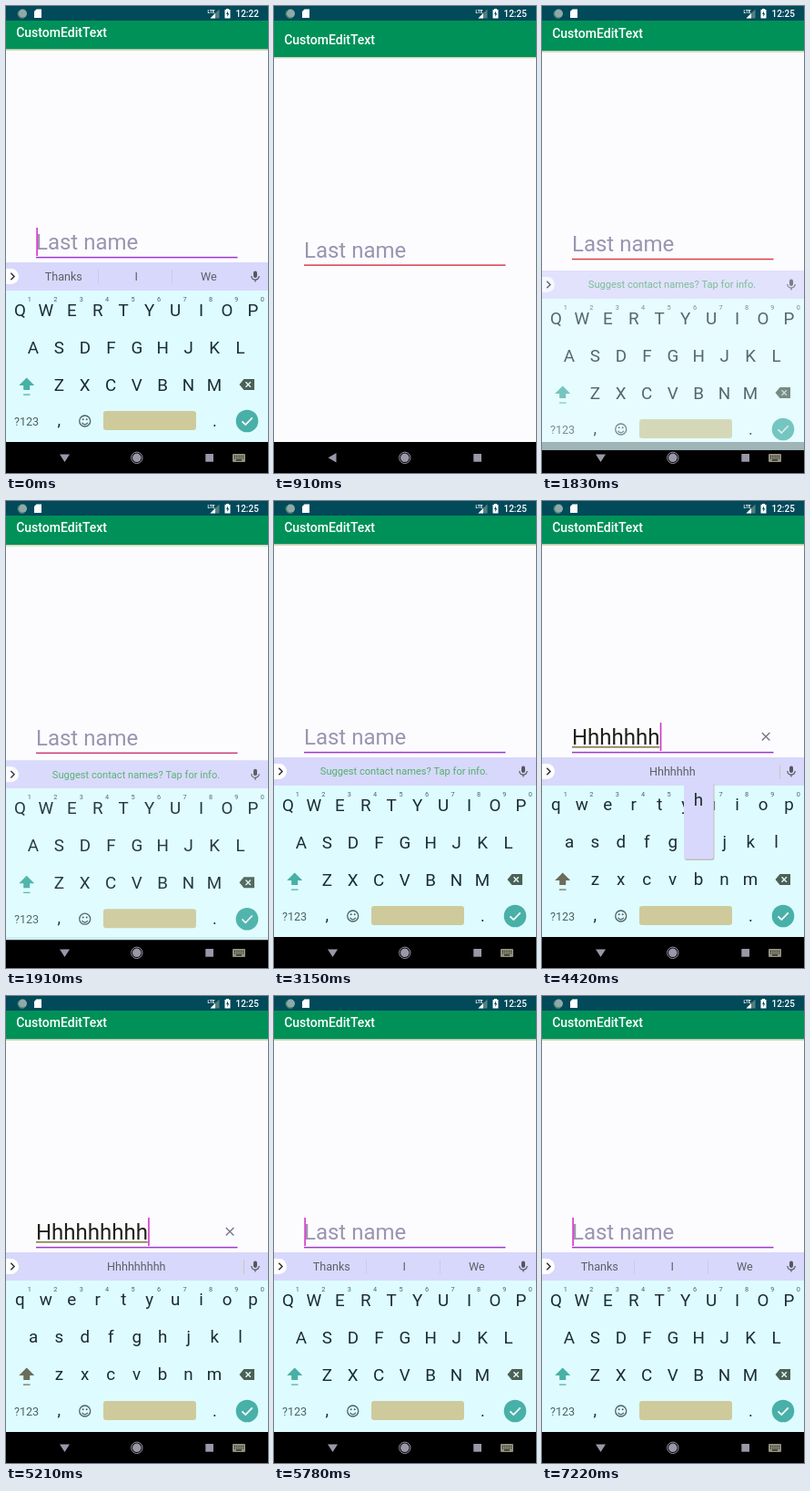
These frames come from a looping animation (288 by 512 pixels, 7.36 s). An HTML page with a canvas:

```html
<!DOCTYPE html>
<html lang="en">
<head>
<meta charset="utf-8">
<title>CustomEditText</title>
<style>
  html, body { margin: 0; width: 100%; height: 100%; overflow: hidden; background: #fcfcff; }
  canvas { display: block; width: 288px; height: 512px; }
</style>
</head>
<body>
<canvas id="stage" width="288" height="512"></canvas>
<script>
const c = document.getElementById('stage').getContext('2d');
const LOOP = 7360, PAN = 8.5;
const TAP = 3370, GAP = 170, TAPS = 9, HOLD = 130, LAG = 20;
const RELEASE = 5210, CLEAR = 5610, CAPS = 5690, IDLE = 5780;
const ROWS = [['QWERTYUIOP', 15.4, 340], ['ASDFGHJKL', 30, 381], ['ZXCVBNM', 58.3, 422]];
const STEP = 28.45;

const clamp = v => Math.max(0, Math.min(1, v));

function rect(x, y, w, h, color) {
  c.fillStyle = color;
  c.fillRect(x, y, w, h);
}

function round(x, y, w, h, r, color) {
  c.fillStyle = color;
  c.beginPath();
  c.roundRect(x, y, w, h, r);
  c.fill();
}

function disc(x, y, r, color) {
  c.fillStyle = color;
  c.beginPath();
  c.arc(x, y, r, 0, 7);
  c.fill();
}

function text(s, x, y, size, color, align = 'left', weight = 400) {
  c.font = `${weight} ${size}px Roboto, sans-serif`;
  c.textAlign = align;
  c.fillStyle = color;
  c.fillText(s, x, y);
}

function fill(d, color) {
  c.fillStyle = color;
  c.fill(new Path2D(d));
}

function line(d, color, width = 1) {
  c.strokeStyle = color;
  c.lineWidth = width;
  c.stroke(new Path2D(d));
}

function statusBar(time) {
  rect(0, 0, 288, 16, '#004a5a');
  disc(18.2, 8.3, 4.8, '#8fa9a8');
  line('M14.5 5.5A4.6 4.6 0 0 0 20 12.6', '#4f8a72', 1.4);
  fill('M33.5 3.5H39V13H31V6Z', '#fff');
  text('LTE', 221.5, 7.5, 5, '#fff', 'left', 700);
  fill('M224.5 13.5L234.5 3.5V13.5Z', '#55807f');
  fill('M224.5 13.5L230 8V13.5Z', '#fff');
  fill('M242 3H245V4H246.5V13.5H240.5V4H242Z', '#fff');
  fill('M244 5.5L242 9H243.3V12L245.2 8.2H244Z', '#004a5a');
  text(time, 252.5, 12, 10, '#fff', 'left', 500);
}

function navBar(typing) {
  rect(0, 478, 288, 34, '#000');
  const grey = '#9898a8';
  fill(typing ? 'M59 491.5H70L64.5 500Z' : 'M59.5 495.3L68.5 490V500.5Z', grey);
  disc(143.8, 495.3, 4.8, grey);
  line('M137.6 495.3a6.2 6.2 0 1 0 12.4 0a6.2 6.2 0 1 0 -12.4 0', grey);
  rect(219.3, 491, 8.7, 8.7, grey);
  if (typing) {
    round(249, 491, 14, 9, 1, '#8f8f7c');
    for (let i = 0; i < 10; i++) rect(251 + i % 5 * 2.3, 493 + (i > 4) * 2.2, 1, 1, '#000');
    rect(253, 497.4, 6, 1, '#000');
  }
}

function app(pan, word, lineColor, cursor) {
  rect(0, 0, 288, 512, '#fcfcff');
  c.save();
  c.translate(0, -pan);
  rect(0, 16, 288, 40, '#009158');
  rect(0, 56, 288, 1.5, '#dcd8bc');
  text('CustomEditText', 11.2, 42, 14, '#fff', 'left', 500);
  if (word) {
    text(word, 33, 275.5, 24, '#202018');
    rect(33, 277.7, c.measureText(word).width, 1.3, '#6c6424');
    line('M241.8 262.4l8.6 8.6m0 -8.6l-8.6 8.6', '#77778a', 1.4);
  } else {
    text('Last name', 33, 275.5, 24, '#9a95b0');
  }
  rect(33, 283.4, 221.5, 1.5, lineColor);
  c.restore();
  if (cursor) {
    c.font = '24px Roboto, sans-serif';
    rect(33.3 + c.measureText(word).width, 243, 1.6, 31, '#d832c8');
  }
}

function strip(mode, word) {
  rect(0, 281, 288, 31, '#d8d8fc');
  round(-10, 288, 24, 17, 8.5, '#fff');
  line('M5.3 292.8L9 296.5L5.3 300.2', '#303038', 1.5);
  round(272, 290.5, 4, 7.5, 2, '#55555c');
  line('M269.8 296a4.2 4.2 0 0 0 8.4 0M274 300v2.6', '#55555c', 1.2);
  const ink = '#5c6068';
  if (mode === 'info') {
    text('Suggest contact names? Tap for info.', 143, 300.3, 11.1, '#4fb06c', 'center');
  } else if (mode === 'word') {
    text(word, 143.3, 301, 12.6, ink, 'center');
    rect(261, 289, 1, 16, '#c9c6bc');
  } else if (mode === 'idle') {
    ['Thanks', 'I', 'We'].forEach((s, i) => text(s, 63.3 + i * 79.8, 301, 12.6, ink, 'center'));
    rect(101, 289, 1, 16, '#cccce6');
    rect(182, 289, 1, 16, '#cccce6');
  }
}

function keyboard(mode, word, lower, pressed) {
  const ink = '#1c2c34', soft = '#4c6064';
  const label = s => lower ? s.toLowerCase() : s;
  strip(mode, word);
  rect(0, 312, 288, 166, '#defcff');

  ROWS.forEach(([keys, x, y], row) => [...keys].forEach((k, i) => {
    text(label(k), x + i * STEP, lower ? y - 1 : y, 18.8, ink, 'center');
    if (!row) text((i + 1) % 10, x + 10.4 + i * STEP, 324, 7.3, soft, 'center');
  }));

  const shift = lower ? '#6c6c5c' : '#48b0a4';
  fill('M22.7 407.5L31.2 416H26.2V421H19.2V416H14.2Z', shift);
  rect(19, 425.5, 7.5, 1.2, shift);
  fill('M256.5 415L261.5 409H273V421H261.5Z', '#4c6054');
  line('M263.5 412.3l5.4 5.4m0 -5.4l-5.4 5.4', '#defcff', 1.4);

  text('?123', 9, 459.6, 12.6, soft);
  text(',', 58.3, 460, 18, ink, 'center');
  text('.', 229.3, 461, 18, ink, 'center');
  line('M80.7 455a6 6 0 1 0 12 0a6 6 0 1 0 -12 0M83.6 456.8a3.4 3.4 0 0 0 6.2 0', soft, 1.3);
  disc(84.7, 453.3, 1, soft);
  disc(88.7, 453.3, 1, soft);
  round(107, 444, 102, 21, 3, '#cfca9c');
  disc(265, 455, 12.3, '#48b0a8');
  line('M259.5 455.3L263.3 459.1L270.8 451.3', '#fff', 1.7);

  if (pressed) {
    round(156.5, 309, 33, 85, 3, '#c4c0bc');
    round(156, 308, 32.5, 84.5, 3, '#d8d8fc');
    text(label('H'), 172, 334, 18.8, ink, 'center');
  }
}

function draw(t) {
  const cover = t < 20;
  const open = cover ? 1 : clamp((t - 1570) / 430);
  const ease = 1 - (1 - open) ** 1.6;

  // Typing: each tap shows the key popup, then adds a letter.
  const since = t - TAP;
  const tap = Math.min(TAPS - 1, Math.floor(since / GAP));
  const count = t < CLEAR ? Math.max(0, Math.min(TAPS, Math.floor((since - LAG) / GAP) + 1)) : 0;
  const word = 'Hhhhhhhhhhhh'.slice(0, count);
  const pressed = since >= 0 && t < RELEASE && (tap === TAPS - 1 || since - tap * GAP < HOLD);

  const cursor = cover || (t >= 2660 && t < 3150) || (t >= TAP + LAG && t < 6750) || t >= 7220;
  const mix = cover ? 1 : clamp((t - 1870) / 130);
  const tint = [[220, 160], [62, 56], [74, 206]].map(([a, b]) => a + (b - a) * mix);
  const mode = cover || t >= IDLE ? 'idle' : count ? 'word' : t < CLEAR ? 'info' : '';

  app(PAN * ease, word, `rgb(${tint})`, cursor);
  statusBar(cover ? '12:22' : '12:25');
  navBar(open > 0);
  if (open > 0) {
    c.save();
    c.globalAlpha = clamp(open * 1.18);
    c.translate(0, 40 * (1 - ease));
    keyboard(mode, word, t >= TAP + LAG && t < CAPS, pressed);
    c.restore();
  }
}

const start = performance.now();
function tick() {
  draw((performance.now() - start) % LOOP);
  requestAnimationFrame(tick);
}
tick();
</script>
</body>
</html>
```
